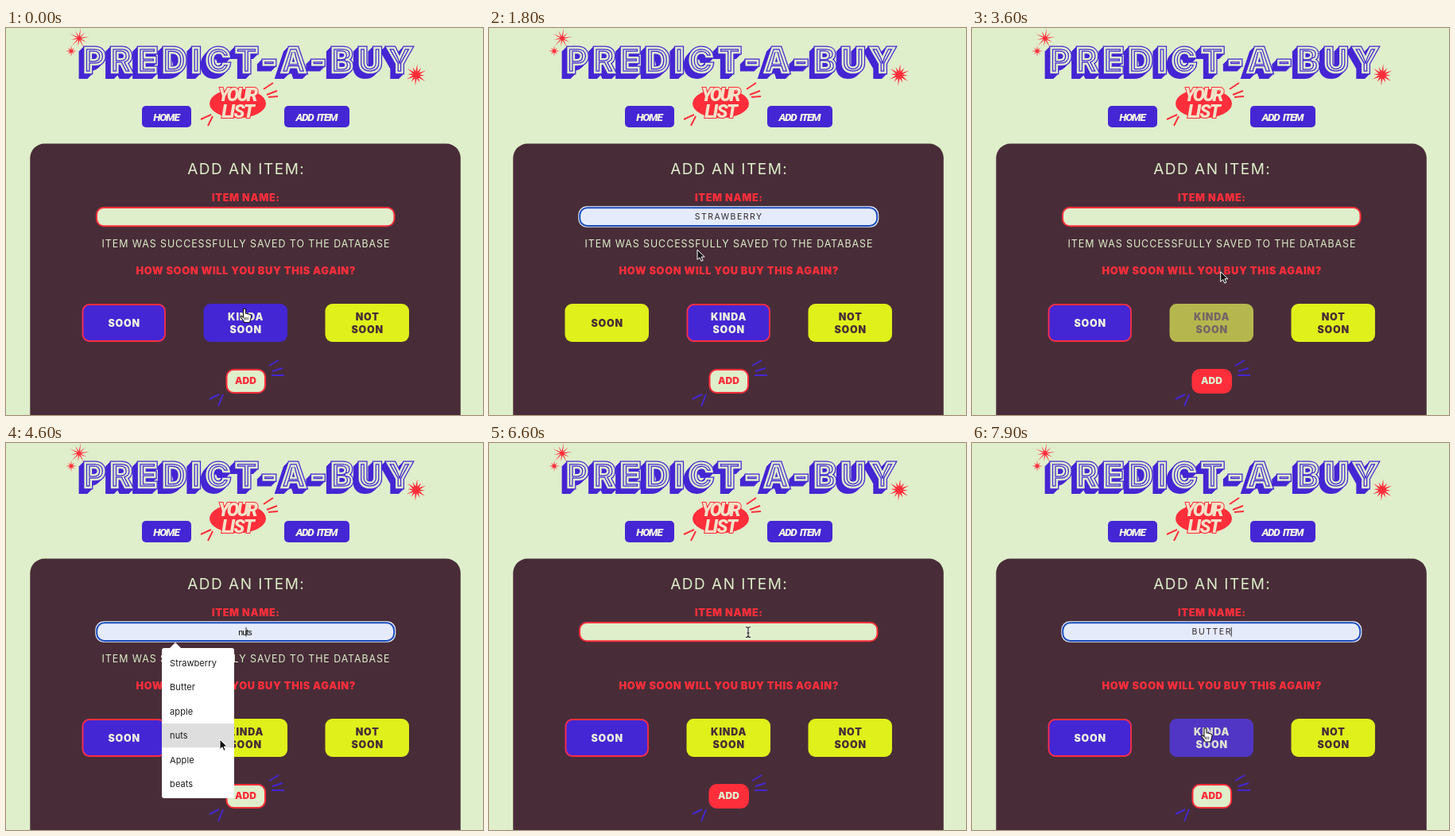
Animation, 600 px wide and 487 px high, one loop 8 s. Source, as an HTML page:

```html
<!DOCTYPE html>
<html lang="en">
<head>
<meta charset="utf-8">
<title>Add an item</title>
<style>
html, body { margin: 0; width: 100%; height: 100%; overflow: hidden; background: #dfeecb; }
svg { display: block; width: 100vw; height: 100vh; }
text { font-family: Inter, "Liberation Sans", sans-serif; text-anchor: middle; }
.slant { font-family: Roboto, "Liberation Sans", sans-serif; font-style: italic; }
.nav { word-spacing: 2.5px; }
.left { text-anchor: start; }
</style>
</head>
<body>
<svg viewBox="0 0 600 487"><g id="page"></g><g id="live"></g></svg>
<script>
const LOOP = 8000, STEP = 100;
const LIGHT = '#dfeecb', DARK = '#482d38', RED = '#fe2e3b', BLUE = '#4526d4';
const rgb = { yellow: [224, 240, 26], blue: [69, 38, 212], dark: [72, 45, 56], light: [236, 242, 222], red: [254, 46, 59], pale: [223, 238, 203] };

// Drawing helpers
const text = (s, x, y, size, weight, fill, gap = 0, extra = '') =>
  `<text x="${x + gap / 2}" y="${y}" font-size="${size}" font-weight="${weight}" fill="${fill}" letter-spacing="${gap}" ${extra}>${s}</text>`;
const box = (x, y, w, h, r, fill, extra = '') =>
  `<rect x="${x}" y="${y}" width="${w}" height="${h}" rx="${r}" fill="${fill}" ${extra}/>`;
const path = (d, fill, stroke = 'none', width = 1) =>
  `<path d="${d}" fill="${fill}" stroke="${stroke}" stroke-width="${width}"/>`;
const outline = (color, width) => `stroke="${color}" stroke-width="${width}"`;
const mix = (a, b, p) => `rgb(${a.map((v, i) => Math.round(v + (b[i] - v) * p))})`;

function star(x, y, outer, inner, points, turn = 0) {
  let d = '';
  for (let i = 0; i < points * 2; i++) {
    const a = i * Math.PI / points + turn;
    const r = i % 2 ? inner : outer * (i % 4 ? 0.8 : 1);
    d += `${i ? 'L' : 'M'}${(x + r * Math.sin(a)).toFixed(1)} ${(y - r * Math.cos(a)).toFixed(1)}`;
  }
  return path(d + 'z', RED);
}

// Blue extrusion, then a pale face with a thin blue inline
function title() {
  const layer = (shift, fill, extra) =>
    text('PREDICT-A-BUY', 304 - shift, 56 + shift, 42, 800, fill, 6.1, extra);
  let out = '';
  for (let i = 6; i > 0; i--) out += layer(i, BLUE, outline(BLUE, 4));
  return out + layer(0, LIGHT, outline(BLUE, 5)) + layer(0, 'none', outline(LIGHT, 2.5));
}

function drawPage() {
  const badge = (s, x, y, gap) => text(s, x, y, 23, 800, '#f0e3c8', gap,
    `class="slant" paint-order="stroke" ${outline(RED, 2)}`);
  const nav = (s, x, w, gap) => box(x, 98, w, 27, 5, BLUE) +
    text(s, x + w / 2, 116.8, 13.5, 900, '#f2f5e2', gap, 'class="slant nav"');
  return title() +
    star(92, 13, 13, 2.4, 10, 0.15) + star(82, 29, 7, 1.8, 8) + star(516, 59, 13.5, 4.5, 12, 0.1) +
    nav('HOME', 171, 62, -1.2) + nav('ADD ITEM', 350, 82, -1.35) +
    `<ellipse cx="291.5" cy="95" rx="35.5" ry="18.5" fill="${RED}"/>` +
    badge('YOUR', 292, 92, -2.8) + badge('LIST', 292, 113, -1.8) +
    path('M324 77L336 69M328 84L341 79M330 87L342 86M245 115L258 109M254 123L260 111', 'none', RED, 2) +
    box(30.3, 145.6, 541.5, 380, 18, DARK) +
    text('ADD AN ITEM:', 301.5, 184, 19, 400, LIGHT, 1.5) +
    text('ITEM NAME:', 301.5, 217.5, 12.6, 900, RED, 0.7) +
    text('HOW SOON WILL YOU BUY THIS AGAIN?', 301.5, 310, 12.8, 900, RED, 0.65) +
    path('M331 425L343 418M335 432L348 428M334 437H350M256 467L268 461M267 476L273 461', 'none', BLUE, 2);
}

// Timeline
const moves = [
  [0, 300, 354], [200, 300, 356], [700, 321, 236], [1100, 321, 236], [1400, 260, 277],
  [1800, 262, 279], [2580, 447, 378], [2800, 447, 378], [3200, 302, 444], [3400, 302, 444],
  [3700, 318, 238], [4200, 318, 238], [4400, 270, 300], [4600, 269, 373], [4800, 262, 400],
  [5000, 262, 400], [5300, 446, 372], [5400, 446, 372], [5600, 401, 417], [5900, 303, 444],
  [6100, 303, 444], [6350, 326, 238], [6800, 326, 238], [7100, 255, 308], [7400, 255, 308],
  [7800, 287, 365], [8000, 300, 354]
];
const choices = [[0, 0], [200, 1], [2800, 2], [3400, 0], [5300, 2], [6100, 0]];
const focusTimes = [[1000, 2800], [4200, 5300], [6700, 8000]];
const menuTimes = [[1000, 1700], [4200, 4900], [6700, 7400]];
const noteTimes = [[0, 2000], [3600, 6100]];
const sentTimes = [[3400, 4000], [6100, 6700]];
const values = [[1700, 3400, 'STRAWBERRY'], [4900, 6100, 'APPLE'], [7400, 8000, 'BUTTER']];
const items = ['Strawberry', 'Butter', 'apple', 'nuts', 'Apple', 'beats'];
const buttons = [['SOON'], ['KINDA', 'SOON'], ['NOT', 'SOON']]
  .map((lines, i) => ({ lines, x: 95.5 + 153 * i, y: 347, w: 105.5, h: 48 }));
const addButton = { x: 276.5, y: 429, w: 50.5, h: 31 };
const field = { x: 113, y: 225, w: 376, h: 25 };
const menu = { x: 196, y: 258, w: 91, h: 189 };
const rowTop = 261.8, rowHeight = 30.4;

const during = (list, t) => list.find(([from, to]) => t >= from && t < to);
const inside = (b, [x, y]) => x >= b.x && x < b.x + b.w && y >= b.y && y < b.y + b.h;

function pointer(t) {
  t = (t + LOOP) % LOOP;
  const i = moves.findIndex(m => m[0] > t);
  const [t0, x0, y0] = moves[i - 1], [t1, x1, y1] = moves[i];
  const p = (t - t0) / (t1 - t0);
  return [x0 + (x1 - x0) * p, y0 + (y1 - y0) * p];
}

const overMenu = t => during(menuTimes, (t + LOOP) % LOOP) && inside(menu, pointer(t));

// Share of the last 250 ms that the pointer spent over a button
function hover(b, t) {
  let hits = 0;
  for (let k = 0; k < 25; k++) {
    const u = t - k * 10;
    if (inside(b, pointer(u)) && !overMenu(u)) hits++;
  }
  return hits / 25;
}

function drawField(t, row) {
  const focus = during(focusTimes, t), value = during(values, t);
  const fill = value || row >= 0 ? '#e6ebfc' : LIGHT;
  let out = focus
    ? box(112.3, 224.3, 378, 26.5, 10.5, '#f4f6ff') + box(114.2, 226.2, 374, 22.8, 9.5, fill, outline('#1b4dbb', 2))
    : box(114, 226, 374.5, 23.3, 9, fill, outline(RED, 2));
  if (value) out += text(value[2], 301, 241.3, 10.5, 400, '#30242c', 1.5);
  else if (row >= 0) out += text(items[row], 301, 241.5, 9.8, 500, '#222', -1);
  if (focus && (t - focus[0]) % 1000 < 500) {
    const x = value ? 301 + value[2].length * 4.2 : 302;
    out += path(`M${x} 232V243.5`, 'none', '#222');
  }
  return out;
}

function drawChoice(b, chosen, t) {
  const p = chosen ? 1 : hover(b, t), cx = b.x + b.w / 2;
  const ink = mix(rgb.dark, rgb.light, p);
  const first = b.lines.length > 1 ? 367.5 : 375.7;
  return box(b.x, b.y, b.w, b.h, 9, mix(rgb.yellow, rgb.blue, p)) +
    (chosen ? box(b.x + 1, b.y + 1, b.w - 2, b.h - 2, 8.5, 'none', outline(RED, 1.8)) : '') +
    b.lines.map((s, i) => text(s, cx, first + 16 * i, 12.5, 900, ink, 0.8)).join('');
}

function drawAdd(t) {
  const p = during(sentTimes, t) ? 1 : hover(addButton, t), b = addButton;
  return box(b.x + 1, b.y + 1, b.w - 2, b.h - 2, 9, mix(rgb.pale, rgb.red, p), outline(RED, 2)) +
    text('ADD', 301.5, 448, 12, 900, mix(rgb.red, rgb.pale, p));
}

function drawMenu(row) {
  return path('M205 259L213 251L221 259z', '#fff') + box(menu.x, menu.y, menu.w, menu.h, 3, '#fff') +
    (row >= 0 ? box(menu.x, rowTop + rowHeight * row, menu.w, rowHeight, 0, '#dedede') : '') +
    items.map((s, i) => text(s, 206, 281 + rowHeight * i, 11, 400, '#1c1c1c', 0.1, 'class="left"')).join('');
}

function drawPointer(t) {
  const at = pointer(t);
  const onButton = !overMenu(t) && [...buttons, addButton].some(b => inside(b, at));
  let shape;
  if (onButton) {
    shape = path('M-1.5 0q1.5-1.6 3 0v5l5.5 1.5q2 .5 1.5 3l-1 4q-.4 2-1.5 3h-6q-2-3-5-7q.3-2 2.5-.4l1 1z', '#fff', '#151515', 1.1) +
      path('M2 10v3.5M4.2 10v3.5M0 10v3.5', 'none', '#151515', 0.8);
  } else if (inside(field, at)) {
    const d = 'M-3-6.5q3 0 3 2q0-2 3-2M0-5V5M-3 6.5q3 0 3-2q0 2 3 2M-1.5 1H1.5';
    shape = path(d, 'none', '#fff', 2.2) + path(d, 'none', '#111', 1.1);
  } else {
    shape = path('M0 0V12.5L3 9.8L5 14.4L7.2 13.4L5.2 9H9.2z', '#111', '#fff', 1);
  }
  return `<g transform="translate(${at[0].toFixed(1)} ${at[1].toFixed(1)})">${shape}</g>`;
}

function draw(t) {
  const open = during(menuTimes, t);
  const under = Math.floor((pointer(t)[1] - rowTop) / rowHeight);
  const row = overMenu(t) ? Math.max(0, Math.min(items.length - 1, under)) : -1;
  const chosen = choices.filter(c => c[0] <= t).pop()[1];
  return drawField(t, row) +
    (during(noteTimes, t) ? text('ITEM WAS SUCCESSFULLY SAVED TO THE DATABASE', 301.5, 276, 12.4, 400, LIGHT, 0.95) : '') +
    buttons.map((b, i) => drawChoice(b, i === chosen, t)).join('') +
    drawAdd(t) + (open ? drawMenu(row) : '') + drawPointer(t);
}

const live = document.getElementById('live');
document.getElementById('page').innerHTML = drawPage();
const start = performance.now();
let shown = -1;
function tick() {
  const t = Math.floor((performance.now() - start) % LOOP / STEP) * STEP;
  if (t !== shown) live.innerHTML = draw(shown = t);
  requestAnimationFrame(tick);
}
tick();
</script>
</body>
</html>
```
